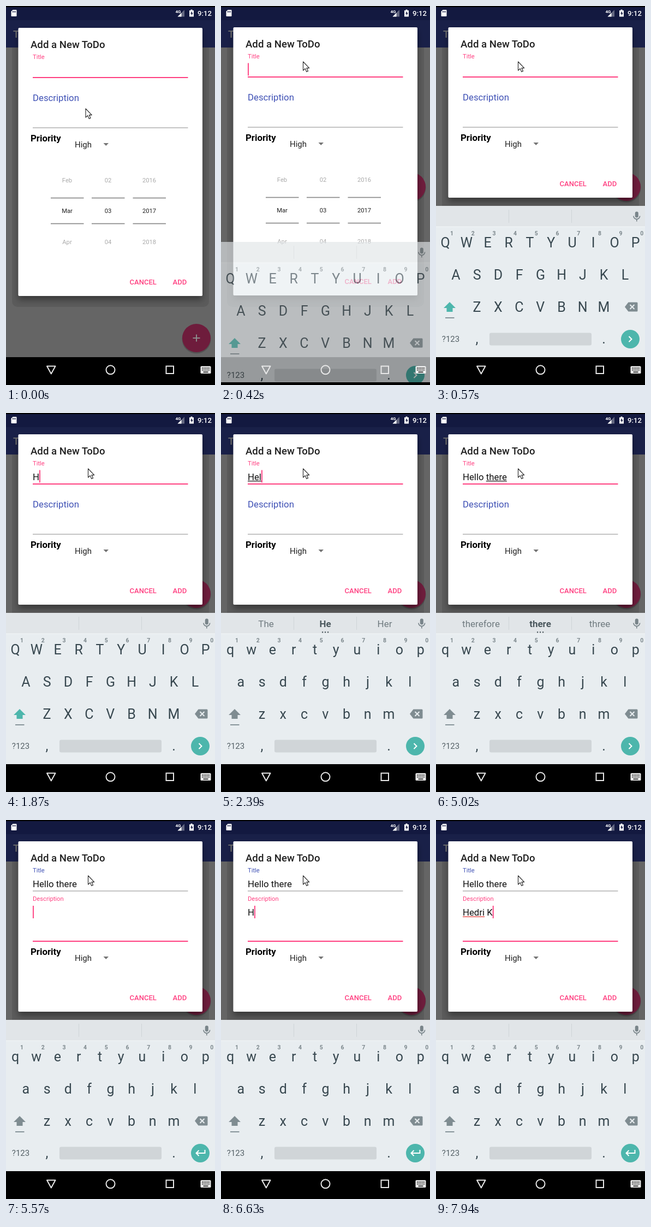
Animation of 383x694 px, one loop 8 s. Source, as an HTML page:

```html
<!DOCTYPE html>
<html lang="en">
<head>
<meta charset="utf-8">
<title>New to-do dialog</title>
<style>
  html, body { margin: 0; width: 100%; height: 100%; overflow: hidden; background: #000; }
  svg { display: block; width: 383px; height: 694px; font-family: Roboto, "Open Sans", sans-serif; }
  text { white-space: pre; }
  .mid { text-anchor: middle; }
  .medium { font-weight: 500; }
  .bold { font-weight: 700; }
  .field { font-size: 16.8px; }
  .label { font-size: 11.2px; }
  .button { font-size: 13.05px; font-weight: 500; fill: #ff4081; }
  .key { font-size: 25px; fill: #37474f; text-anchor: middle; }
  .digit { font-size: 10.5px; font-weight: 700; fill: #7d888d; text-anchor: middle; }
  .sugg { font-size: 17px; fill: #6f7a7f; text-anchor: middle; }
  .wheel { font-size: 11.2px; text-anchor: middle; }
</style>
</head>
<body>
<svg viewBox="0 0 383 694">
  <defs>
    <filter id="shadow" x="-20%" y="-20%" width="140%" height="140%">
      <feDropShadow dx="0" dy="7" stdDeviation="6" flood-color="#000" flood-opacity=".38"/>
    </filter>
    <clipPath id="kbClip"><rect width="383" height="689"/></clipPath>
  </defs>

  <!-- dimmed app -->
  <rect width="383" height="694" fill="#000"/>
  <rect y="76" width="383" height="567" fill="#656565"/>
  <path d="M11 76H372V541a10 10 0 0 1-10 10H21a10 10 0 0 1-10-10Z" fill="#5b5b5b"/>
  <rect y="2" width="383" height="24" fill="#131940"/>
  <rect y="26" width="383" height="50" fill="#192048"/>
  <text x="13" y="57.5" class="medium" font-size="18.6" fill="#707070">T</text>
  <g id="fab">
    <circle r="26.5" cy="2" fill="#000" opacity=".18"/>
    <circle r="26" fill="#6e1c3c"/>
    <path d="M-6.500 0H6.500M0-6.500V6.500" stroke="#8c8c8c" stroke-width="2"/>
  </g>

  <!-- status bar -->
  <g fill="#fff">
    <path d="M12.500 7H18.500a1 1 0 0 1 1 1V18a1 1 0 0 1-1 1H10.500a1 1 0 0 1-1-1V10Z"/>
    <path d="M12.500 9v3M14.800 9v3M17.100 9v3" stroke="#131940" stroke-width="1.100"/>
    <text x="310.500" y="12.500" class="bold" font-size="8">4G</text>
    <path d="M327 7V19.500H314.500Z" opacity=".35"/>
    <path d="M321.500 12.500V19.500H314.500Z"/>
    <path d="M338.500 6.500h3V8h2.500V19.500H336V8h2.500Z"/>
    <path d="M341 9.500l-3 4.500h1.800v3.500l3-4.800h-1.800Z" fill="#131940"/>
    <text x="351" y="18" class="medium" font-size="13.2">9:12</text>
  </g>

  <!-- dialog -->
  <g id="dialog">
    <rect id="sheet" x="22.500" y="39" width="337.500" height="491" rx="2" fill="#fff" filter="url(#shadow)"/>
    <text x="45" y="75.500" class="medium" font-size="18.6" fill="#212121">Add a New ToDo</text>
    <text id="titleLabel" x="49" y="95.500" class="label">Title</text>
    <rect id="titleLine" x="49" width="284.500"/>
    <text id="descLabel" x="49">Description</text>
    <rect id="descLine" x="49" width="284.500"/>
    <g id="title"></g>
    <g id="desc"></g>
    <text x="45" y="247.300" class="bold" font-size="16.8" fill="#000">Priority</text>
    <text x="126" y="258" font-size="15" fill="#212121">High</text>
    <path d="M178.500 250h9.500l-4.750 5Z" fill="#757575"/>
    <g id="wheels"></g>
    <g id="buttons" class="button">
      <text x="226.500" y="0">CANCEL</text>
      <text x="305.500" y="0">ADD</text>
    </g>
  </g>

  <!-- keyboard -->
  <g clip-path="url(#kbClip)"><g id="kb">
    <rect y="366" width="383" height="277" fill="#e8edf0"/>
    <rect y="643" width="383" height="70" fill="#e8edf0" id="kbTail"/>
    <rect y="366" width="383" height="38" fill="#e1e5e8"/>
    <rect y="403.500" width="383" height="1.500" fill="#eff3f5"/>
    <path d="M133.500 373V397M248.500 373V397" stroke="#cfd4d7"/>
    <rect x="364.800" y="376.500" width="6" height="11" rx="3" fill="#79858a"/>
    <path d="M362 384.500a5.800 5.800 0 0 0 11.600 0M367.800 390.500V394.500" fill="none" stroke="#79858a" stroke-width="1.700"/>
    <g id="suggs"></g>
    <g id="keys"></g>
    <g id="shift">
      <path d="M25 542L36 553H30.500V560H19.500V553H14Z"/>
    </g>
    <rect x="17" y="570" width="16.500" height="2" fill="#87949a"/>
    <path d="M352.500 542.500H368a1.500 1.500 0 0 1 1.500 1.500V558a1.500 1.500 0 0 1-1.500 1.500H352.500L346 551Z" fill="#7f8c91"/>
    <path d="M355.500 547l8 8m0-8l-8 8" stroke="#e8edf0" stroke-width="2"/>
    <text x="27" y="615.300" class="mid" font-size="15" fill="#546066">?123</text>
    <text x="75" y="618" class="key">,</text>
    <text x="307.500" y="618" class="key">.</text>
    <rect x="98" y="598.500" width="187" height="23" rx="3" fill="#d0d5d8"/>
    <circle cx="356" cy="610" r="17" fill="#4db6ac"/>
    <path id="enter" fill="none" stroke="#fff" stroke-width="2"/>
  </g></g>

  <!-- navigation bar -->
  <g fill="none" stroke="#e8e8e8" stroke-width="2" stroke-linejoin="round">
    <path d="M75 659.500H90.500L82.750 673.500Z"/>
    <circle cx="191.500" cy="666.300" r="8"/>
    <rect x="293.500" y="659.500" width="13.500" height="13.500" stroke-linejoin="miter"/>
  </g>
  <rect x="356.500" y="659.500" width="19" height="13.500" rx="1.500" fill="#f2f2f2"/>
  <path d="M359 663H374M359 666.500H374" stroke="#222" stroke-width="1.800" stroke-dasharray="1.800 1.100"/>
  <path d="M361.500 670.300H370.500" stroke="#222" stroke-width="1.800"/>

  <path id="mouse" d="M0 0V16L3.700 12.600L6.300 18.500L9 17.300L6.400 11.600H11.200Z" fill="#fff" stroke="#222" stroke-width="1.100" stroke-linejoin="round"/>
</svg>
<script>
const LOOP = 8000, PINK = '#ff4081', BLUE = '#3f51b5', GRAY = '#8a8a8a';
const $ = id => document.getElementById(id);
const set = (id, attrs) => {
  for (const k in attrs) $(id).setAttribute(k, attrs[k]);
};
const label = (x, y, cls, str, extra = '') =>
  `<text x="${x}" y="${y}" class="${cls}" ${extra}>${str}</text>`;
const rect = (x, y, w, h, fill) =>
  `<rect x="${x}" y="${y}" width="${w}" height="${h}" fill="${fill}"/>`;

const pen = document.createElement('canvas').getContext('2d');
function textWidth(str) {
  pen.font = '16.8px Roboto, "Open Sans", sans-serif';
  return pen.measureText(str).width;
}

// Each step changes only the listed parts of the state.
// mark: [start, end, colour] of the underlined part of the focused text.
const BLACK = '#222', RED = '#e53935';
const steps = [
  [0, { title: '', desc: '', inDesc: false, float: 0, caret: false, caps: true, mark: null,
        sugg: '', kb: 0, drop: 0, tall: true, fabY: 608, top: 1, mouse: [146, 188] }],
  [150, { top: 0, mouse: [150.5, 102], caret: true }],
  [290, { kb: .3, drop: 125, fabY: 331 }],
  [420, { kb: .65, drop: 66 }],
  [570, { kb: 1, drop: 0, tall: false, caret: false }],
  [1130, { caret: true }],
  [1570, { caret: false }],
  [1870, { title: 'H', caret: true }],
  [2000, { caps: false, mark: [0, 1, BLACK] }],
  [2130, { title: 'He', mark: [0, 2, BLACK], sugg: 'I|H|Hi' }],
  [2260, { sugg: 'The|He|Her' }],
  [2390, { title: 'Hel', mark: [0, 3, BLACK] }],
  [2540, { sugg: 'Help|Hel|Held' }],
  [2680, { title: 'Hell', mark: [0, 4, BLACK] }],
  [2810, { sugg: 'Hello|Hell|He\'ll' }],
  [2960, { title: 'Hello', mark: [0, 5, BLACK], sugg: 'Hell|Hello|Hells' }],
  [3090, { title: 'Hello ', mark: null }],
  [3230, { sugg: 'I|there|and' }],
  [3540, { caret: false }],
  [3830, { title: 'Hello t', caret: true, mark: [6, 7, BLACK] }],
  [3980, { title: 'Hello th', mark: [6, 8, BLACK], sugg: 'to|t|the' }],
  [4120, { sugg: 'the|th|this' }],
  [4270, { title: 'Hello the', mark: [6, 9, BLACK], sugg: 'they|the|then' }],
  [4410, { title: 'Hello ther', mark: [6, 10, BLACK], sugg: 'there|ther|the' }],
  [4560, { title: 'Hello there', mark: [6, 11, BLACK], sugg: 'therefore|there|three' }],
  [5020, { caret: false }],
  [5140, { inDesc: true, caret: true, mark: null, float: .2 }],
  [5280, { float: .85, sugg: '' }],
  [5430, { float: 1 }],
  [5720, { caret: false }],
  [6190, { caret: true }],
  [6630, { desc: 'H' }],
  [6780, { mark: [0, 1, BLACK], sugg: 'I|H|He' }],
  [6920, { desc: 'He', mark: [0, 2, BLACK] }],
  [7070, { desc: 'Hed', mark: [0, 3, BLACK], sugg: 'The|He|Her' }],
  [7210, { desc: 'Hedr', mark: [0, 4, BLACK], sugg: 'Head|Hed|Hedge' }],
  [7510, { desc: 'Hedri', mark: [0, 5, BLACK], sugg: 'Heard|Hedr|Hedge' }],
  [7660, { desc: 'Hedri ', mark: [0, 5, RED], sugg: 'Heard|Hedri|Here' }],
  [7940, { desc: 'Hedri K', sugg: '' }]
];

function stateAt(t) {
  const s = {};
  for (const [start, change] of steps) if (start <= t) Object.assign(s, change);
  return s;
}

function keyRows(caps) {
  const rows = [['qwertyuiop', 17, 442], ['asdfghjkl', 36.4, 501], ['zxcvbnm', 75, 560]];
  let out = '';
  for (const [chars, x, y] of rows)
    [...chars].forEach((c, i) => {
      out += label(x + i * 38.75, y, 'key', caps ? c.toUpperCase() : c);
    });
  for (let i = 0; i < 10; i++) out += label(29 + i * 38.7, 420.3, 'digit', (i + 1) % 10);
  return out;
}

function wheels() {
  const columns = [[112, 'Feb Mar Apr'], [187, '02 03 04'], [262.5, '2016 2017 2018']];
  return columns.map(([x, items]) =>
    items.split(' ').map((str, i) =>
      label(x, 322 + i * 56.3, 'wheel', str, `fill="${i === 1 ? '#212121' : '#aaa'}"`)).join('') +
    rect(x - 30, 349.7, 60.5, 1.7, GRAY) + rect(x - 30, 396.7, 60.5, 1.7, GRAY)).join('');
}

function field(str, base, focused, s) {
  let out = label(49, base, 'field', str, 'fill="#111"');
  if (!focused) return out;
  if (s.mark) {
    const [from, to, colour] = s.mark, x = textWidth(str.slice(0, from));
    out += rect(49 + x, base + 1.5, textWidth(str.slice(0, to)) - x, 1.3, colour);
  }
  if (s.caret) out += rect(49 + textWidth(str), base - 18, 1.9, 23, PINK);
  return out;
}

function suggestions(list) {
  if (!list) return '';
  const words = list.split('|').map((w, i) =>
    label([82.5, 191, 300][i], 392.3, i === 1 ? 'sugg bold' : 'sugg', w, i === 1 ? 'style="fill:#4a575d"' : ''));
  const dots = [185, 190, 195].map(x => rect(x, 400.3, 2.2, 2.2, '#4a575d'));
  return words.concat(dots).join('');
}

function underline(id, y, focused) {
  set(id, { y: focused ? y - 1 : y - .5, height: focused ? 2 : 1, fill: focused ? PINK : GRAY });
}

function draw(t) {
  const s = stateAt(t);
  set('fab', { transform: `translate(349 ${s.fabY})` });
  set('dialog', { transform: `translate(0 ${s.top})` });
  set('sheet', { height: s.tall ? 491 : 312 });
  set('wheels', { display: s.tall ? 'inline' : 'none' });
  set('buttons', { transform: `translate(0 ${s.tall ? 509 : 330.2})` });

  set('titleLabel', { fill: s.inDesc ? BLUE : PINK });
  set('descLabel', { y: 173 - 25 * s.float, 'font-size': 16.8 - 5.6 * s.float, fill: s.inDesc ? PINK : BLUE });
  underline('titleLine', 130, !s.inDesc);
  underline('descLine', 222, s.inDesc);
  $('title').innerHTML = field(s.title, 122.5, !s.inDesc, s);
  $('desc').innerHTML = field(s.desc, 175, s.inDesc, s);

  set('kb', { opacity: s.kb, transform: `translate(0 ${s.drop})` });
  set('kbTail', { display: s.drop ? 'inline' : 'none' });
  set('shift', { fill: s.caps ? '#4db6ac' : '#7f8c91' });
  set('enter', { d: s.inDesc ? 'M364.500 604V610H348.500M353.500 605L348.500 610L353.500 615'
                             : 'M353.500 605L358.500 610L353.500 615' });
  $('keys').innerHTML = keyRows(s.caps);
  $('suggs').innerHTML = suggestions(s.sugg);
  set('mouse', { transform: `translate(${s.mouse})` });
}

$('wheels').innerHTML = wheels();
const begin = performance.now();
let shown = -1;
function tick() {
  const t = (performance.now() - begin) % LOOP;
  const index = steps.filter(step => step[0] <= t).length;
  if (index !== shown) draw(t);
  shown = index;
  requestAnimationFrame(tick);
}
tick();
</script>
</body>
</html>
```
